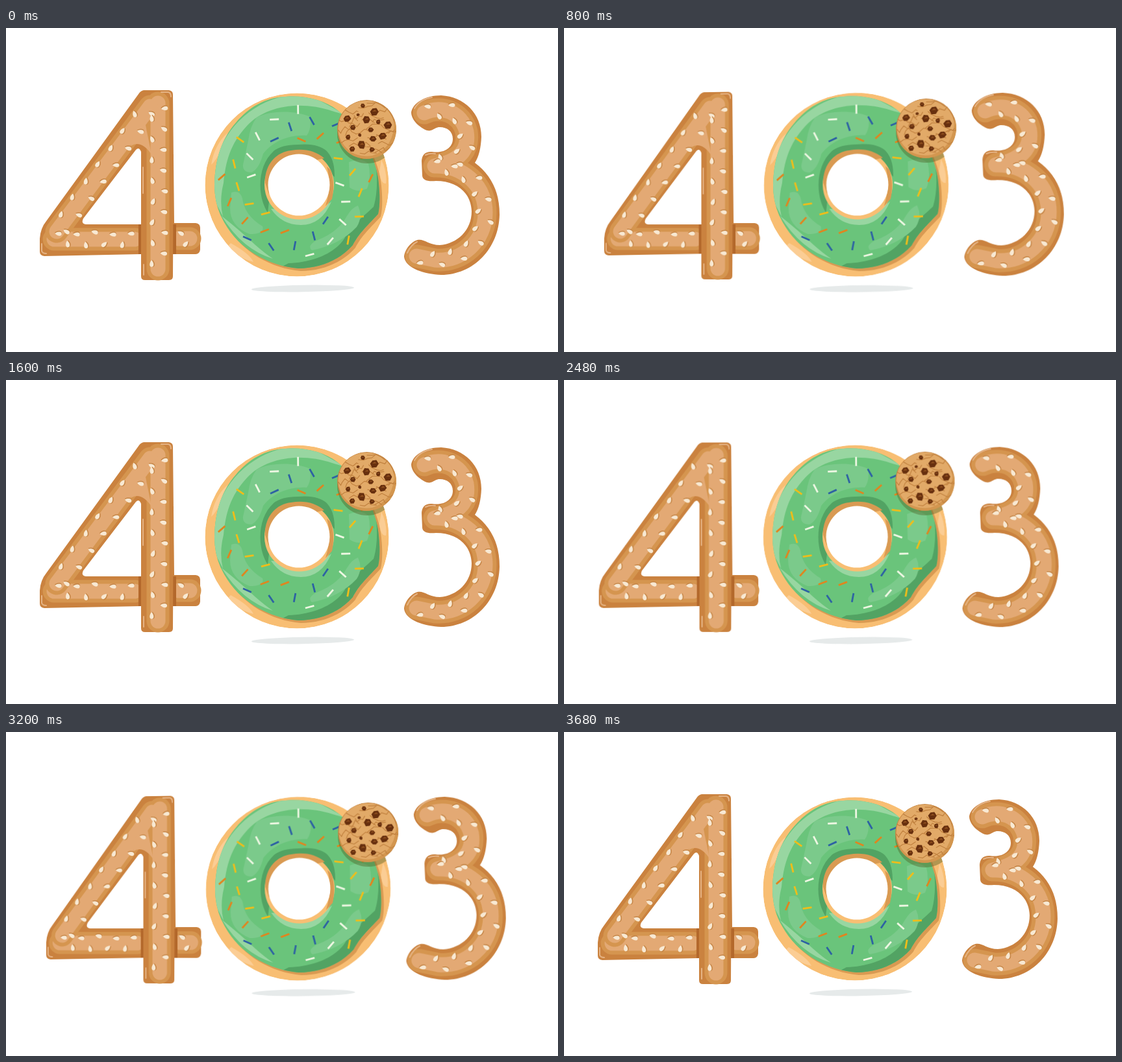
An HTML page for the animation above (4000 ms loop, 850 by 500 pixels).

```html
<!DOCTYPE html>
<html lang="en">
<head>
<meta charset="utf-8">
<title>403</title>
<style>
html, body { margin: 0; width: 100%; height: 100%; overflow: hidden; background: #fff; }
svg { display: block; width: 850px; height: 500px; transform-origin: 412px 310px; }
.edge { fill: #ca823f; }
.mid, .light, .gloss, .cracks { fill: none; stroke-linecap: round; stroke-linejoin: round; }
.mid { stroke: #d5954f; stroke-width: 35; }
.light { stroke: #e3a974; stroke-width: 23; }
.gloss { stroke: #e5b384; stroke-width: 2; }
.cracks { stroke: #c1813f; stroke-width: 1.2; }
</style>
</head>
<body>
<svg id="scene" viewBox="0 0 850 500">
<defs>
  <path id="diagonal" d="M222 121L78 314"/>
  <path id="bar" d="M74 326H198"/>
  <path id="stem" d="M234 116V372"/>
  <path id="arm" d="M266 325H283"/>
  <path id="curl" d="M644 131C670 119 701 129 709 160C713 186 701 205 660 213C702 212 738 241 738 285C738 329 702 361 661 358L632 352"/>
  <path id="three" d="M624 130C627 115 646 104 670 104C706 106 732 132 732 168Q731 194 722 208C746 226 760 251 760 288C759 340 720 381 670 381C645 380 615 371 613 353C614 341 625 329 634 327C643 325 652 335 668 335C695 333 717 312 717 283C716 254 694 236 662 236Q642 238 641 228L640 205Q641 190 656 191C676 194 688 184 688 171C688 158 677 152 666 153C658 155 656 160 648 158C638 154 624 143 624 130Z"/>
  <path id="glaze" d="M321 242C322 200 333 170 354 146C374 122 400 107 430 106C465 103 500 114 518 134C545 155 571 200 574 240Q577 270 573 287C553 309 544 316 534 335C515 357 485 371 450 371C405 367 360 343 336 300Q321 275 321 242Z"/>
  <clipPath id="inThree"><use href="#three"/></clipPath>
  <clipPath id="inGlaze"><use href="#glaze"/></clipPath>
  <clipPath id="inDonut"><circle cx="448" cy="242" r="141.5"/></clipPath>
  <clipPath id="inCookie"><circle cx="555.5" cy="156.5" r="45.5"/></clipPath>
  <g id="seed">
    <path d="M6.5 1.5C3-2.5-5-4-5.2 1S2 6 6.5 1.5Z" fill="#c58546"/>
    <path d="M6 0C2-4-5-4.5-5 0S2 4 6 0Z" fill="#f8e9d3"/>
  </g>
</defs>

<ellipse cx="457" cy="402" rx="79" ry="5.2" transform="rotate(-1 457 402)" fill="#e6eaea"/>

<g id="four">
  <path class="edge" fill-rule="evenodd" d="M212 96H251Q257 97 257 103L259 301H292Q299 302 299 308V342Q298 349 292 349H207L59 352Q52 351 52 345V325Q53 309 62 298L204 102Q207 97 212 96ZM200 188L119 294Q115 302 123 303H209L208 191Q205 183 200 188Z"/>
  <use href="#bar" class="mid"/>
  <use href="#arm" class="mid"/>
  <use href="#bar" class="light"/>
  <use href="#arm" class="light"/>
  <path d="M204 303H262V349H204Z" fill="#b3682b"/>
  <path class="edge" d="M208 195H258L257 383Q257 389 251 389H214Q208 389 208 383Z"/>
  <use href="#stem" class="mid"/>
  <use href="#diagonal" class="mid"/>
  <use href="#stem" class="light"/>
  <use href="#diagonal" class="light"/>
  <path d="M196 160L213 140L224 195Q208 172 192 182Z" fill="#e3a974"/>
  <path class="gloss" d="M239 99H250Q254 100 254 106M55 333V344Q56 348 62 348M212 365V381M211 215V255"/>
</g>

<use href="#three" class="edge"/>
<g clip-path="url(#inThree)">
  <use href="#curl" class="mid"/>
  <use href="#curl" class="light"/>
</g>
<path class="gloss" d="M629 124Q637 110 656 107M646 196Q652 193 661 194M618 347Q624 334 633 330"/>

<g clip-path="url(#inDonut)">
  <circle cx="448" cy="242" r="141.5" fill="#f8be73"/>
  <use href="#glaze" x="4" y="4" fill="#d99a52"/>
  <path d="M316 211Q321 180 341 162Q335 188 320 207ZM341 337Q357 355 381 361Q375 348 346 332ZM578 203Q587 222 585 240Q577 241 575 222Z" fill="#fbcd94"/>
  <use href="#glaze" fill="#6ac47b"/>
  <g clip-path="url(#inGlaze)">
    <path d="M318 260C310 170 380 98 465 102L525 135L502 128C455 112 400 119 371 151C345 179 338 207 335 239Q328 267 334 291Z" fill="#98d6a1"/>
    <path d="M580 205L568 203C573 229 572 256 566 276C545 296 533 303 521 325C506 348 472 362 435 363L410 376H510L585 300Z" fill="#52a363"/>
    <path d="M332 290Q362 314 383 334Q400 349 411 356Q364 342 332 290Z" fill="#98d6a1"/>
    <path d="M386 138C407 127 446 127 468 137Q471 155 463 166C435 164 410 176 396 194Q390 217 378 223Q364 223 365 211Q370 188 373 174Q376 151 386 138ZM528 207Q547 199 558 209Q563 231 556 248Q541 255 529 246ZM542 274Q550 291 540 307Q515 334 471 343Q463 336 478 328Q512 315 525 290Q533 277 542 274ZM347 254Q360 249 364 263Q367 289 395 306Q399 318 375 318Q345 306 345 278Z" fill="#7bca8b"/>
    <path d="M403 285C386 258 387 213 412 190Q424 180 449 180Q480 177 494 190C505 202 506 217 506 230L480 205L410 225Z" fill="#52a363"/>
    <path d="M408 279Q425 304 454 304Q486 304 501 268L480 284Z" fill="#98d6a1"/>
  </g>
  <ellipse cx="451.5" cy="242" rx="53.5" ry="53.500" fill="#f8be73"/>
  <path d="M399 239C398 210 417 191 439 189Q470 184 490 201L477 204Q445 187 419 207Q403 222 405 257ZM500 219Q507 240 502 264L492 275Q502 242 494 214Z" fill="#d99a52"/>
  <circle cx="451" cy="242" r="47.5" fill="#fff"/>
  <g id="sprinkles" stroke-width="2.8"></g>
  <circle cx="556" cy="163" r="46" fill="#4d5a20" opacity=".4"/>
</g>

<g id="cookie" clip-path="url(#inCookie)">
  <circle cx="555.5" cy="156.5" r="45.5" fill="#c78743"/>
  <circle cx="555" cy="155.5" r="43.5" fill="#e2aa68"/>
  <path d="M598 137Q600 185 564 197Q529 202 514 170Q518 202 555 203Q603 198 602 150Z" fill="#d3964f"/>
</g>
</svg>
<script>
const el = id => document.getElementById(id);
const add = (id, markup) => el(id).insertAdjacentHTML('beforeend', markup);
const repeat = (n, make) => Array.from({ length: n }, (_, i) => make(i)).join('');

let state = 7;
const random = (min, max) => {
  state = state * 16807 % 2147483647;
  return min + (max - min) * state / 2147483647;
};

// Evenly filled ring: each point turns by the golden angle.
const ring = (i, n, cx, cy, inner, outer) => {
  const r = Math.sqrt(inner ** 2 + (outer ** 2 - inner ** 2) * (i + .5) / n);
  return [cx + r * Math.cos(i * 2.4), cy + r * Math.sin(i * 2.4)];
};

// Seeds alternate between both sides of a centre line.
function seeds(id, gap, spread) {
  const line = el(id), count = Math.round(line.getTotalLength() / gap);
  add('scene', repeat(count, i => {
    const d = (i + .5) * gap, p = line.getPointAtLength(d), q = line.getPointAtLength(d - 1);
    const side = (i % 2 ? -spread : spread) + random(-2, 2);
    const x = p.x + (p.y - q.y) * side, y = p.y - (p.x - q.x) * side;
    const angle = i % 2 ? random(-130, -30) : random(170, 215);
    return `<use href="#seed" transform="translate(${x} ${y}) rotate(${angle}) scale(.95)"/>`;
  }));
}
seeds('diagonal', 16, 11);
seeds('bar', 14, 9);
seeds('stem', 16, 9);
seeds('arm', 7, 7);
seeds('curl', 16, 9);

const colors = ['#eef7e3', '#f0bd19', '#e0851f', '#2d62a3'];
add('sprinkles', repeat(40, i => {
  const [x, y] = ring(i, 40, 449, 241, 64, 119);
  return `<path d="M-7 0H7" stroke="${colors[i % 4]}" transform="translate(${x} ${y}) rotate(${random(0, 180)})"/>`;
}));

add('cookie', repeat(26, i => {
  const [x, y] = ring(i, 26, 555, 156, 5, 43);
  const jag = repeat(4, () => `l${random(2, 8)} ${random(-6, 6)}`);
  return `<path class="cracks" d="M${x - 8} ${y}${jag}"/>`;
}));
add('cookie', repeat(16, i => {
  const [x, y] = ring(i, 16, 554, 157, 4, 38), size = random(2.5, 7);
  const corners = repeat(6, n => {
    const r = size * random(.8, 1.15);
    return `${x + r * Math.cos(n * Math.PI / 3)},${y + r * Math.sin(n * Math.PI / 3)} `;
  });
  return `<polygon points="${corners}" fill="#672f0e"/>
    <path d="M${x - size * .5} ${y}l${size * .6} ${-size * .5} ${size * .5} ${size * .4}z" fill="#90501f"/>`;
}));

// The scene turns about a vertical axis and back twice per loop, in 80 ms steps.
function draw(now) {
  const step = Math.floor(now % 4000 / 80);
  const swing = Math.max(0, 8 - Math.abs(step - 12), 8 - Math.abs(step - 38));
  el('scene').style.transform = `translateX(${swing * .07}px) matrix3d(1,0,0,${-swing * .0000125},0,1,0,0,0,0,1,0,0,0,0,1)`;
  requestAnimationFrame(draw);
}
draw(performance.now());
</script>
</body>
</html>
```
